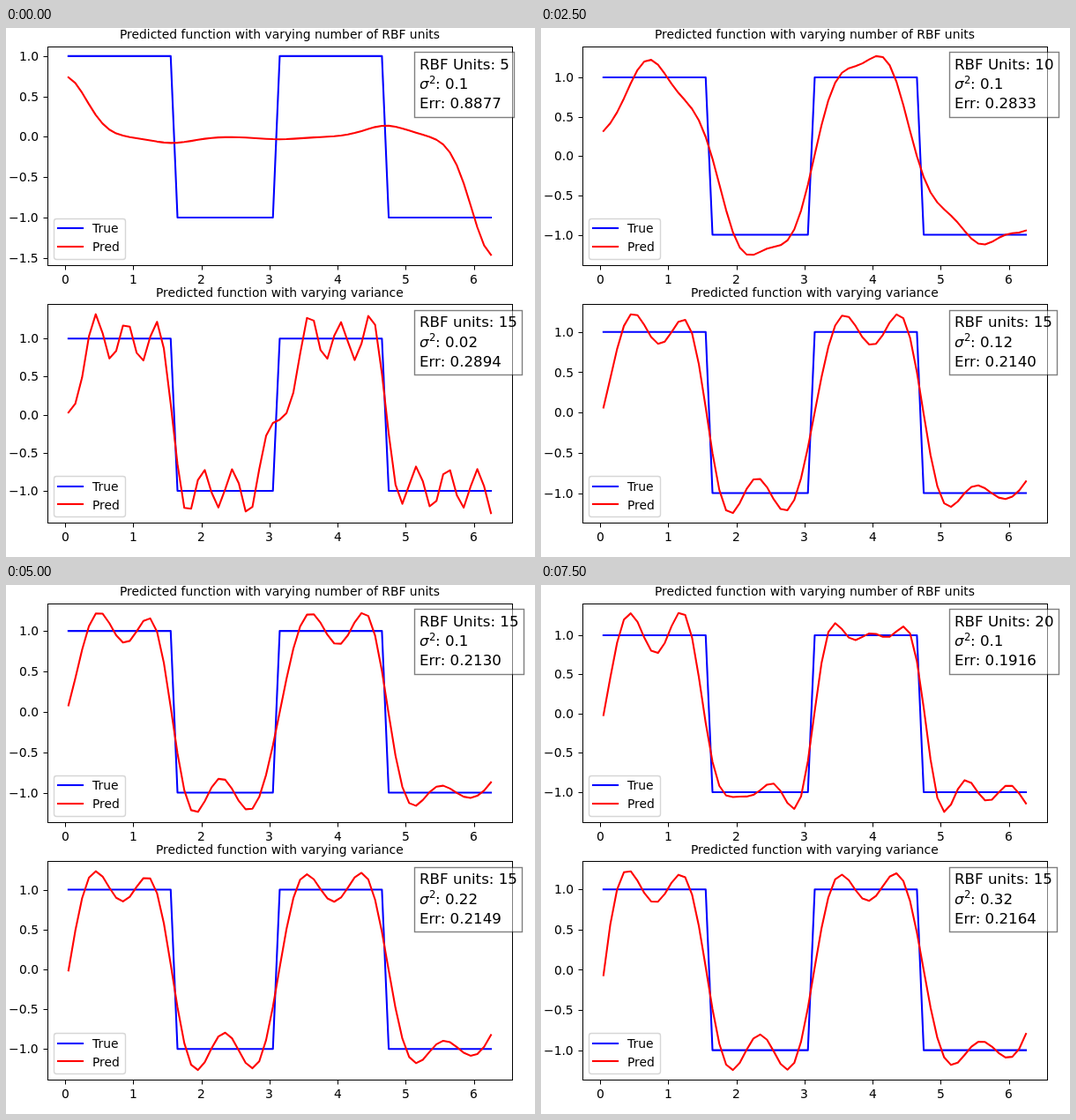
Write an HTML page with a canvas that moves like this. It is 600x600 px and loops after 8 s.

```html
<!DOCTYPE html>
<html lang="en">
<head>
<meta charset="utf-8">
<title>RBF approximation</title>
<style>
html, body { margin: 0; width: 100%; height: 100%; overflow: hidden; background: #fff; }
canvas { display: block; }
</style>
</head>
<body>
<canvas id="stage" width="600" height="600"></canvas>
<script>
const ctx = document.getElementById("stage").getContext("2d");
const TAU = 2 * Math.PI, STEP = 500, COUNT = 16;
const LEFT = 46.9, WIDTH = 527.1, HEIGHT = 248;
const SMALL = 13.89, LARGE = 16.67;
const FAMILY = '"DejaVu Sans", sans-serif';

// ---- RBF network fitted by least squares ----
const square = x => (Math.sin(2 * x) > 0 ? 1 : -1);
const train = Array.from({ length: 63 }, (_, i) => i / 10);
const test = train.map(x => x + 0.05);
const truth = test.map(square);

function solve(m) {
  const n = m.length;
  for (let c = 0; c < n; c++) {
    let p = c;
    for (let r = c + 1; r < n; r++) if (Math.abs(m[r][c]) > Math.abs(m[p][c])) p = r;
    [m[c], m[p]] = [m[p], m[c]];
    for (let r = c + 1; r < n; r++) {
      const f = m[r][c] / m[c][c];
      for (let k = c; k <= n; k++) m[r][k] -= f * m[c][k];
    }
  }
  const w = Array(n).fill(0);
  for (let r = n - 1; r >= 0; r--) {
    let s = m[r][n];
    for (let k = r + 1; k < n; k++) s -= m[r][k] * w[k];
    w[r] = s / m[r][r];
  }
  return w;
}

function fit(units, variance) {
  const basis = x => Array.from({ length: units }, (_, i) => {
    const d = x - i * TAU / (units - 1);
    return Math.exp(-d * d / (2 * variance));
  });
  const m = Array.from({ length: units }, () => Array(units + 1).fill(0));
  for (const x of train) {
    const b = basis(x), y = square(x);
    for (let i = 0; i < units; i++) {
      for (let j = 0; j < units; j++) m[i][j] += b[i] * b[j];
      m[i][units] += b[i] * y;
    }
  }
  const w = solve(m);
  const pred = test.map(x => basis(x).reduce((s, v, i) => s + v * w[i], 0));
  const err = pred.reduce((s, v, i) => s + Math.abs(v - truth[i]), 0) / pred.length;
  return { pred, err };
}

// ---- Drawing helpers ----
// Thin strokes sit on pixel centres, text on whole pixels.
const snap = v => Math.round(v) + 0.5;

function text(str, x, y, size = SMALL, align = 0, style = "") {
  ctx.font = `${style} ${size}px ${FAMILY}`;
  ctx.fillStyle = "#000";
  const w = ctx.measureText(str).width;
  ctx.fillText(str, Math.round(x - w * align), Math.round(y));
  return w;
}

function polyline(points, color, width) {
  ctx.beginPath();
  for (const [x, y] of points) ctx.lineTo(x, y);
  ctx.strokeStyle = color;
  ctx.lineWidth = width;
  ctx.stroke();
}

const mapX = x => LEFT + (x + 0.26) / 6.82 * WIDTH;

function drawLegend(top) {
  ctx.beginPath();
  ctx.roundRect(54.5, snap(top + 195), 81, 46, 2.8);
  ctx.fillStyle = "rgba(255,255,255,0.8)";
  ctx.fill();
  ctx.strokeStyle = "rgba(204,204,204,0.8)";
  ctx.lineWidth = 1.39;
  ctx.stroke();
  ctx.lineCap = "square";
  [["True", "#00f"], ["Pred", "#f00"]].forEach(([label, color], i) => {
    const base = top + 211.8 + i * 20.4;
    const y = Math.round(base - 5.2);
    polyline([[59, y], [87, y]], color, 2.08);
    text(label, 98, base);
  });
}

function drawInfo(top, name, units, variance, err) {
  const x = LEFT + WIDTH * 0.8, pad = 5.56, heading = `${name}: ${units}`;
  ctx.font = `${LARGE}px ${FAMILY}`;
  const w = ctx.measureText(heading).width;
  const x0 = snap(x - pad), x1 = snap(x + w + pad);
  const y0 = snap(top + 6.84), y1 = snap(top + 79.94);
  ctx.fillStyle = "rgba(255,255,255,0.5)";
  ctx.fillRect(x0, y0, x1 - x0, y1 - y0);
  ctx.strokeStyle = "rgba(0,0,0,0.5)";
  ctx.lineWidth = 1.39;
  ctx.strokeRect(x0, y0, x1 - x0, y1 - y0);

  const mid = top + 48.4;
  text(heading, x, top + 26, LARGE);
  let pen = x + text("σ", x, mid, LARGE, 0, "italic") + 0.8;
  pen += text("2", pen, mid - 6.3, LARGE * 0.7);
  text(`: ${variance}`, pen, mid, LARGE);
  text(`Err: ${err.toFixed(4)}`, x, top + 70.6, LARGE);
}

function drawPlot(top, title, name, units, variance, label) {
  const { pred, err } = fit(units, variance);
  const lo = Math.min(-1, ...pred), hi = Math.max(1, ...pred);
  const pad = (hi - lo) * 0.05;
  const mapY = y => top + (hi + pad - y) / (hi - lo + 2 * pad) * HEIGHT;
  const curve = ys => ys.map((y, i) => [mapX(test[i]), mapY(y)]);
  const bottom = top + HEIGHT;
  const x0 = snap(LEFT), x1 = snap(LEFT + WIDTH), y0 = snap(top), y1 = snap(bottom);

  ctx.lineCap = "square";
  ctx.lineJoin = "round";
  polyline(curve(truth), "#00f", 2.08);
  polyline(curve(pred), "#f00", 2.08);

  ctx.lineCap = "butt";
  ctx.lineJoin = "miter";
  for (let i = 0; i <= 6; i++) {
    const x = snap(mapX(i));
    polyline([[x, y1], [x, y1 + 5]], "#000", 1);
    text(String(i), mapX(i), bottom + 21, SMALL, 0.5);
  }
  for (let v = -2; v <= 2; v += 0.5) {
    if (v < lo - pad || v > hi + pad) continue;
    const y = snap(mapY(v));
    polyline([[x0 - 5, y], [x0, y]], "#000", 1);
    text(v.toFixed(1).replace("-", "\u2212"), LEFT - 9.72, mapY(v) + 5.05, SMALL, 1);
  }
  ctx.strokeStyle = "#000";
  ctx.lineWidth = 1;
  ctx.strokeRect(x0, y0, x1 - x0, y1 - y0);
  text(title, LEFT + WIDTH / 2, top - 8.33, SMALL, 0.5);
  drawInfo(top, name, units, label, err);
  drawLegend(top);
}

function draw(k) {
  ctx.fillStyle = "#fff";
  ctx.fillRect(0, 0, 600, 600);
  drawPlot(20.6, "Predicted function with varying number of RBF units",
    "RBF Units", 5 + k, 0.1, "0.1");
  const variance = 0.02 * (k + 1);
  drawPlot(313.4, "Predicted function with varying variance",
    "RBF units", 15, variance, variance.toFixed(2));
}

let shown = -1;
function tick(now) {
  const k = Math.floor(now / STEP) % COUNT;
  if (k !== shown) draw(shown = k);
  requestAnimationFrame(tick);
}
draw(shown = 0);
requestAnimationFrame(tick);
</script>
</body>
</html>
```
